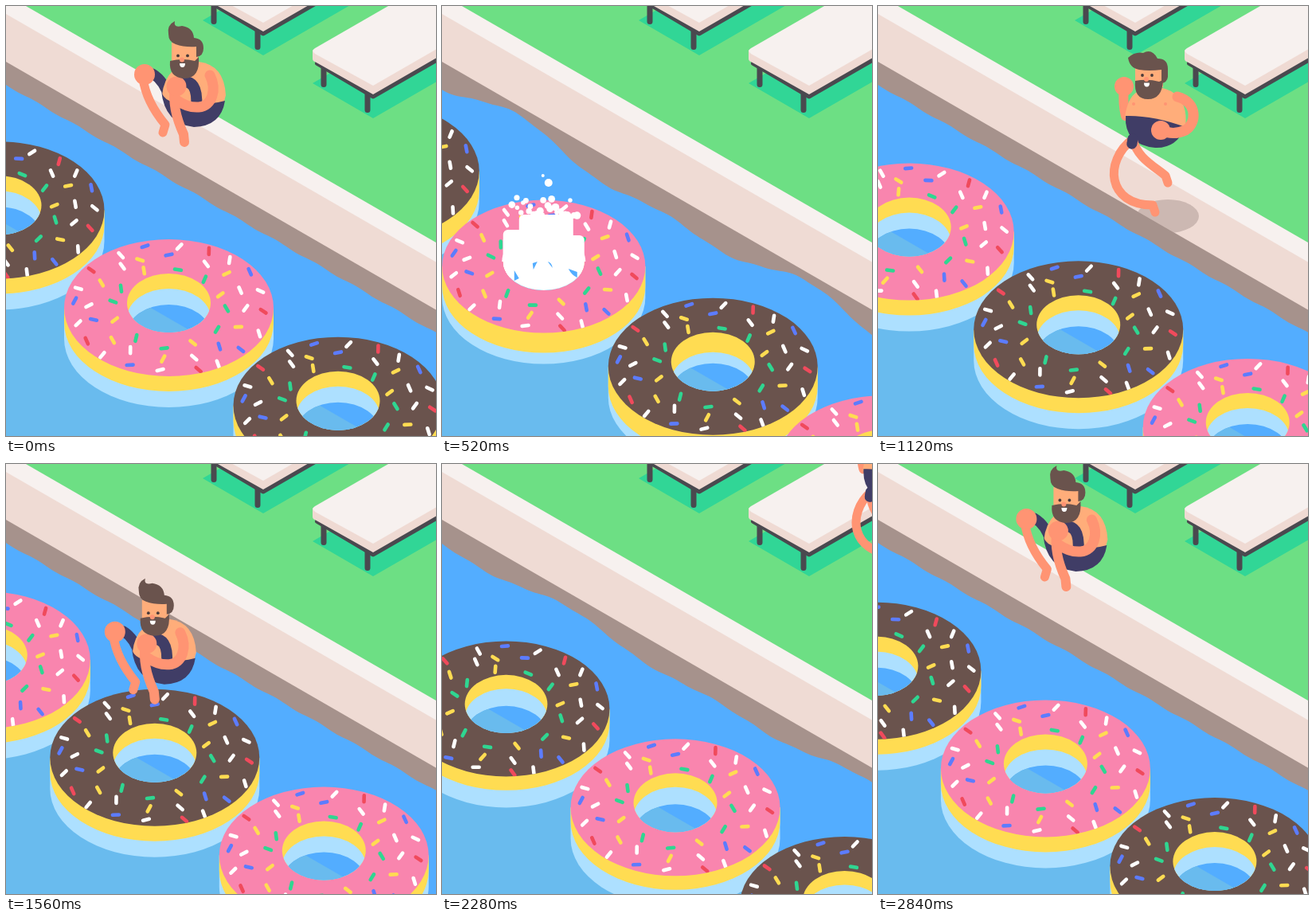
Write an HTML page with a canvas that moves like this. It is 540x540 px and loops after 2880 ms.

```html
<!DOCTYPE html>
<html lang="en">
<head>
<meta charset="utf-8">
<title>Pool jump</title>
<style>
html, body { margin: 0; width: 100%; height: 100%; overflow: hidden; background: #53adff; }
canvas { display: block; width: 100vw; height: 100vh; }
</style>
</head>
<body>
<canvas id="stage" width="540" height="540"></canvas>
<script>
const ctx = document.getElementById('stage').getContext('2d');
const JUMP = 1440, STEP = 40, SLOPE = 0.577, TAU = Math.PI * 2;
const RX = 131.5, RY = 86, HOLE_RX = 52.5, HOLE_RY = 37, HOLE_UP = 6, DEPTH = 39;
const WATER = '#53adff', SHALLOW = '#69bbee', FOAM = '#ade0ff';
const PINK = '#f985ae', CHOCOLATE = '#6a534d';
const RED = '#f04a5c', WHITE = '#ffffff', BLUE = '#5c7cff', GREEN = '#2fd691', YELLOW = '#ffdc52';
const SKIN = '#ffad7a', LIMB = '#ff9473', NAVY = '#403d66', HAIR = '#6a534d';

const clamp = v => Math.max(0, Math.min(1, v));
const ease = v => { v = clamp(v); return v * v * (3 - 2 * v); };
const random = seed => {
  const v = Math.sin(seed * 12.9898) * 43758.5453;
  return v - Math.floor(v);
};

function fill(color, d) {
  ctx.fillStyle = color;
  ctx.fill(new Path2D(d));
}
function line(color, width, d) {
  ctx.strokeStyle = color;
  ctx.lineWidth = width;
  ctx.stroke(new Path2D(d));
}
function ellipse(x, y, rx, ry = rx) {
  ctx.beginPath();
  ctx.ellipse(x, y, rx, ry, 0, 0, TAU);
}
function disc(color, x, y, rx, ry) {
  ellipse(x, y, rx, ry);
  ctx.fillStyle = color;
  ctx.fill();
}
function scoped(draw) {
  ctx.save();
  draw();
  ctx.restore();
}

function water() {
  ctx.fillStyle = WATER;
  ctx.fillRect(0, 0, 540, 540);
  fill(SHALLOW, 'M0 274L540 586H0Z');
}

function poolWall(p) {
  const swell = Math.sin(Math.PI * clamp((p - 240) / 740)) / 0.927;
  const edge = x => {
    const a = (x - 95 - (p - 520) * 0.2) * TAU / 365;
    const wave = -9 * Math.cos(a) - 7.4 * Math.cos(2 * a) - 1.6;
    return 99 + SLOPE * x + swell * wave + 0.9 * Math.sin(x / 8);
  };
  ctx.beginPath();
  ctx.moveTo(540, 0);
  ctx.lineTo(0, 0);
  for (let x = 0; x <= 540; x += 4) ctx.lineTo(x, edge(x));
  ctx.fillStyle = '#a6928c';
  ctx.fill();
}

function lounger(x, y) {
  scoped(() => {
    ctx.translate(x, y);
    fill('#31d696', 'M385 97L461 141L721 -9L645 -53Z');
    line('#4a494f', 7, 'M399 76V98.5M454 110V130.5');
    line('#4a494f', 6, 'M391 72L461 113.5L721 -36.5');
    fill('#efdad3', 'M385 55V66Q385 69 388 70L461 111L721 -39V-60L461 95Z');
    fill('#f7f1ef', 'M388 60Q383 56 388 53L645 -95L721 -50L461 100Z');
  });
}

function terrace() {
  fill('#efdbd4', 'M0 0H540V381.5L0 70Z');
  fill('#f7f1ef', 'M0 0H540V321.5L0 10Z');
  fill('#6ddf84', 'M25 0H540V297Z');
  lounger(-138, -79);
  lounger(0, 0);
}

function slab(color, x, y, size, height) {
  const rx = RX * size;
  ctx.beginPath();
  ctx.ellipse(x, y + height, rx, RY * size, 0, 0, Math.PI);
  ctx.lineTo(x - rx, y);
  ctx.lineTo(x + rx, y);
  ctx.fillStyle = color;
  ctx.fill();
}

// Three circles of sprinkles, each with its own run of colours.
function sprinkles(x, y, size, turn) {
  const circle = (radius, count, colors) => {
    for (let i = 0; i < count; i++) {
      const seed = i + count * 7;
      const at = (i + 0.4 * random(seed)) / count * TAU + turn;
      const r = (radius + 0.07 * (random(seed + 0.3) - 0.5)) * size;
      const sx = x + RX * r * Math.cos(at), sy = y + RY * r * Math.sin(at);
      const tilt = random(seed + 0.6) * Math.PI + turn;
      const dx = 4 * Math.cos(tilt), dy = 4 * Math.sin(tilt);
      line(colors[i % colors.length], 4.6, `M${sx - dx} ${sy - dy}L${sx + dx} ${sy + dy}`);
    }
  };
  circle(0.56, 12, [GREEN, GREEN, YELLOW]);
  circle(0.74, 16, [WHITE, YELLOW, BLUE, WHITE, YELLOW]);
  circle(0.92, 20, [RED, WHITE, BLUE, WHITE]);
}

function ring(x, y, color, above, turn, size) {
  const rx = HOLE_RX * size, ry = HOLE_RY * size, top = y - HOLE_UP;
  slab(FOAM, x, y, size, DEPTH);
  slab(YELLOW, x, y, size, above);
  disc(color, x, y, RX * size, RY * size);
  scoped(() => {
    ellipse(x, y, RX * size, RY * size);
    ctx.clip();
    sprinkles(x, y, size, turn);
  });
  scoped(() => {
    ellipse(x, top, rx, ry);
    ctx.clip();
    ctx.fillStyle = YELLOW;
    ctx.fillRect(x - 60, y - 50, 120, 100);
    disc(FOAM, x, top + above, rx, ry);
    ellipse(x, top + DEPTH, rx, ry);
    ctx.clip();
    water();
  });
}

// Hides whatever passes below the front rim of the hole.
function clipToHole(x, y, size) {
  ctx.beginPath();
  ctx.rect(0, 0, 540, y);
  ctx.ellipse(x, y, HOLE_RX * size, HOLE_RY * size, 0, 0, Math.PI);
  ctx.clip();
}

function face(x, y) {
  disc('#4a3b3b', x - 6, y - 1, 1.9);
  disc('#4a3b3b', x + 6, y - 1, 1.9);
  disc(LIMB, x - 1, y + 4, 3);
  fill('#fff', `M${x - 4} ${y + 8.5}h7q0 5 -3.5 5t-3.5 -5Z`);
}

function runner(p) {
  const d = (1120 - p) * (p < 1120 ? 0.78 : 0.41);
  const beat = Math.min(0, p - 1120) * TAU / 320;
  const bounce = -8 * Math.abs(Math.sin(beat));
  const rise = p > 1200 ? 48 * ((1365 - p) / 165) ** 2 - 48 : 0;
  const swap = (1 - Math.cos(beat)) / 2;
  scoped(() => {
    ctx.clip(new Path2D('M0 70L540 381.5V0H0Z'));
    disc('rgba(150,130,125,.4)', 364 + d, 264 - d * SLOPE, 39, 21);
  });
  scoped(() => {
    ctx.translate(d, -d * SLOPE + bounce + rise);
    const leg = mix => {
      const at = (front, back) => front + (back - front) * mix;
      const knee = `${at(283, 325)} ${at(195, 190)}`;
      const shin = `${at(288, 345)} ${at(250, 200)}`;
      const heel = `${at(345, 361)} ${at(250, 213)}`;
      line(LIMB, 11, `M320 167C${knee} ${shin} ${heel}l3 9`);
      line(NAVY, 13, 'M320 167l-1 6');
    };
    leg(swap);
    line(LIMB, 12, 'M309 103Q307 122 311 138');
    fill(SKIN, 'M310 140Q313 116 325 108Q345 96 368 107Q390 120 386 152Q350 165 310 140Z');
    fill(NAVY, 'M311 138Q345 137 386 152Q375 179 348 178Q309 174 311 138Z');
    leg(1 - swap);
    disc(LIMB, 309, 101, 12);
    disc(LIMB, 321, 123, 2);
    disc(LIMB, 361, 123, 2);
    line(LIMB, 13, 'M376 114C402 121 400 148 386 156Q371 163 355 156');
    disc(LIMB, 355, 156, 12);
    fill(SKIN, 'M323 74H358V102H323Z');
    fill(HAIR, 'M314 65Q323 57 333 59Q344 53 351 66Q364 66 364 79V89Q363 96 356 97V80Q340 82 328 80Q316 78 314 65Z');
    fill(HAIR, 'M323 94Q339 91 353 95L358 93Q357 117 339 117Q321 117 323 94Z');
    face(338, 88);
  });
}

// q is the time from the start of the fall past the pool edge.
function tucked(q) {
  const drop = q + 75;
  const eyes = 40.3 + (drop < 0 ? 48 * (drop / 165) ** 2 : 0.00385 * drop * drop);
  scoped(() => {
    ctx.translate(-0.31 * q, eyes - 62);
    line(NAVY, 13, 'M205 116Q199 94 184 85');
    line(LIMB, 11, 'M172 91Q176 120 200 149L197 159');
    disc(LIMB, 174, 86, 13);
    fill(SKIN, 'M196 112Q200 72 242 70Q274 74 276 112Q270 143 235 143Q203 140 196 112Z');
    fill(NAVY, 'M195 106Q197 119 215 122Q248 126 275 119Q270 151 236 152Q199 148 195 106Z');
    line(NAVY, 14, 'M239 127Q242 90 218 96');
    line(LIMB, 13, 'M256 87C265 105 259 126 242 127Q228 128 214 118');
    line(LIMB, 12, 'M212 103Q208 128 223 161L224 171');
    disc(LIMB, 214, 101, 12.5);
    fill(SKIN, 'M208 46H241V74H208Z');
    fill(HAIR, 'M204 35Q202 24 212 19Q210 28 221 25Q235 27 236 40Q248 41 248 53Q248 63 239 64V51Q224 52 213 48Q204 45 204 35Z');
    fill(HAIR, 'M206 69Q222 65 237 69L242 64Q244 91 224 91Q204 90 206 69Z');
    face(222, 63.5);
  });
}

function splash(p, x, y, size) {
  if (p < 180 || p > 606) return;
  const k = (p - 330) / (p < 330 ? 150 : 276);
  const height = 1.9 * (1 - k * k);
  const column = (left, right, top) => {
    ctx.beginPath();
    ctx.roundRect(x + left, y - top * height, right - left, top * height + 20, 6);
    ctx.fill();
  };
  scoped(() => {
    clipToHole(x, y, size);
    disc('#fff', x, y, HOLE_RX, HOLE_RY * clamp(height));
    column(-51, 51, 33);
    column(-51, -20, 40);
    column(-31, 37, 59);
    fill(WATER, `M${x - 37} ${y + 11}v13l6 -3zM${x + 31} ${y + 9}q4 8 11 11v-7z` +
      `M${x - 14} ${y + 2}l6 -2l-5 10zM${x + 5} ${y}q5 1 6 8z`);
  });
  const spread = clamp((p - 130) / 390);
  const drop = (dx, dy, r) => disc('#fff', x + dx * spread, y - dy * height, r);
  for (let i = 0; i < 26; i++) {
    drop(-40 + 84 * (i + random(i)) / 26, 56 + 26 * random(i + 40), 2.5 + 2.5 * random(i + 80));
  }
  drop(6, 99, 5);
  drop(-1, 108, 2);
}

function draw(time) {
  const cycle = Math.floor(time / JUMP), p = time % JUMP;
  const u = clamp((p - 180) / 760);
  const bob = -2.06 * Math.sin(3 * Math.PI * u) * (1 - u);
  const squeeze = Math.sin(Math.PI * u);
  const size = 1 - 0.03 * squeeze;
  const shift = p / JUMP;
  const x = 204.5 - 212.5 * shift, y = 379 - 122.7 * shift - 4.7 * bob;
  const hitY = y - 3 * squeeze;

  ctx.lineCap = ctx.lineJoin = 'round';
  water();
  poolWall(p);
  terrace();
  for (let k = -1; k <= 3; k++) {
    const hit = k === 0;
    const turn = 0.24 * (k < 0 ? 1 : hit ? ease((p - 180) / 720) : 0);
    const color = (k + cycle) % 2 ? CHOCOLATE : PINK;
    ring(x + k * 212.5, (hit ? hitY : y) + k * 122.7, color, 19 + 6 * bob, turn, hit ? size : 1);
  }
  scoped(() => {
    if (p < 240) {
      clipToHole(x, hitY - HOLE_UP, size);
      tucked(p);
    } else if (p >= 1240) {
      tucked(p - JUMP);
    } else if (p >= 760) {
      runner(p);
    }
  });
  splash(p, x, hitY - HOLE_UP, size);
}

const start = performance.now();
function tick() {
  const elapsed = (performance.now() - start) % (2 * JUMP);
  draw(Math.floor(elapsed / STEP) * STEP);
  requestAnimationFrame(tick);
}
tick();
</script>
</body>
</html>
```
